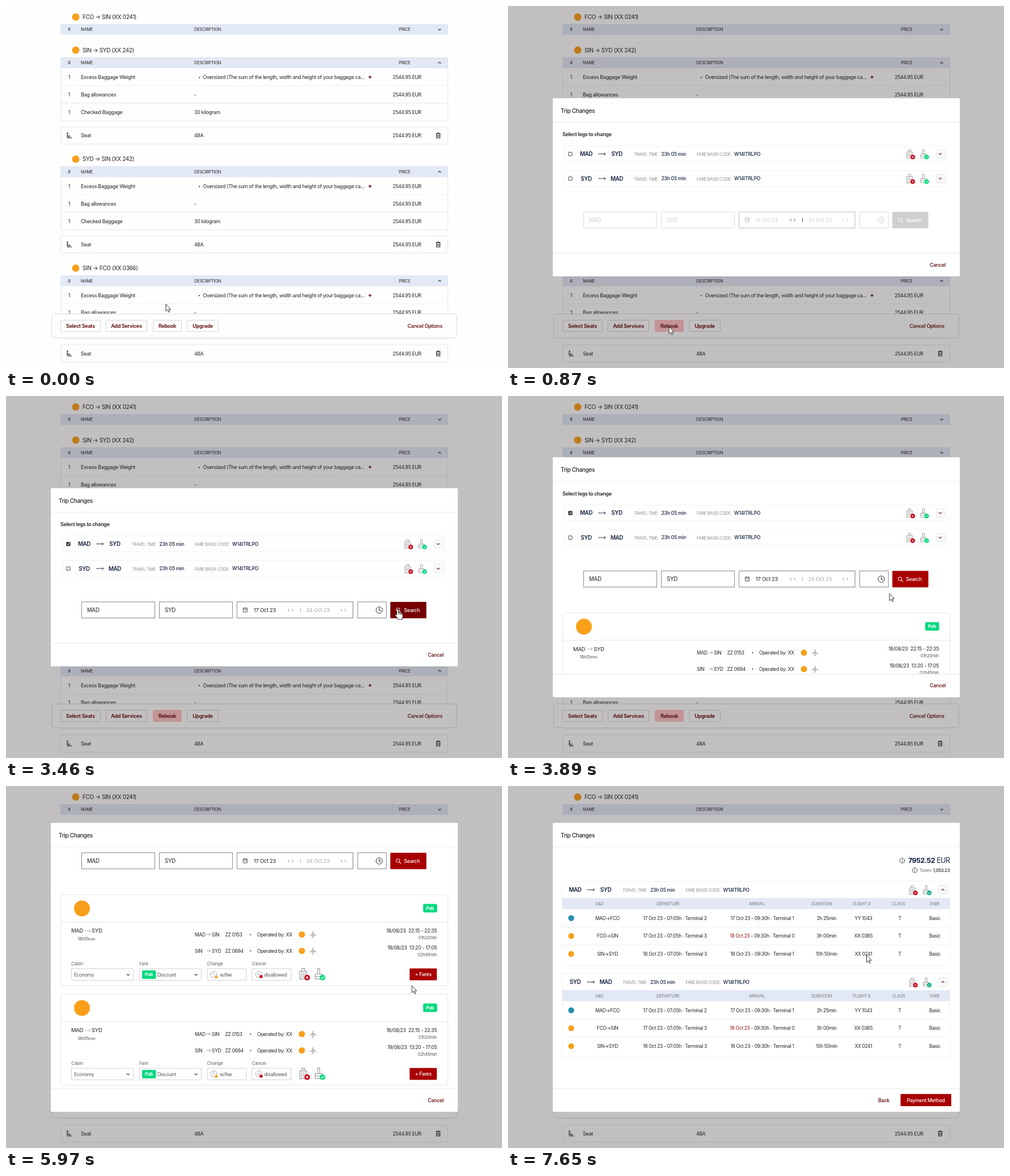
An HTML page that plays this animation: 875 by 640 pixels, repeating every 8000 ms.

```html
<!DOCTYPE html>
<html lang="en">
<head>
<meta charset="utf-8">
<title>Flight change</title>
<style>
html, body { margin: 0; width: 100%; height: 100%; overflow: hidden; background: #fefefe; }
svg { display: block; }
text { font-family: Inter, "Open Sans", sans-serif; letter-spacing: -.035em; white-space: pre; }
</style>
</head>
<body>
<svg id="stage" width="875" height="640" viewBox="0 0 875 640"></svg>
<script>
const INK = '#222', NAVY = '#14213f', WINE = '#5c0508', RED = '#a80000', DARK_RED = '#760000',
  BAND = '#e2e9f5', ORANGE = '#f9a01b', GREEN = '#00d97e', LINE = '#e4e6ea';

// Drawing helpers; text is centred vertically on y
const text = (x, y, s, size = 9, color = INK, weight = 400, anchor = 'start') =>
  `<text x="${x}" y="${y + size * .36}" font-size="${size}" fill="${color}" font-weight="${weight}" text-anchor="${anchor}">${s}</text>`;
const mid = (x, y, s, size, color, weight) => text(x, y, s, size, color, weight, 'middle');
const end = (x, y, s, size, color, weight) => text(x, y, s, size, color, weight, 'end');
const rect = (x, y, w, h, fill, stroke = 'none', r = 0, extra = '') =>
  `<rect x="${x}" y="${y}" width="${w}" height="${h}" fill="${fill}" stroke="${stroke}" rx="${r}" ${extra}/>`;
const path = (d, stroke = INK, width = 1, fill = 'none') =>
  `<path d="${d}" stroke="${stroke}" stroke-width="${width}" fill="${fill}"/>`;
const dot = (x, y, r, fill, stroke = 'none') => `<circle cx="${x}" cy="${y}" r="${r}" fill="${fill}" stroke="${stroke}"/>`;
const at = (x, y, s, scale = 1) => `<g transform="translate(${x} ${y}) scale(${scale})">${s}</g>`;
const group = (id, s) => `<g id="${id}">${s}</g>`;
const rule = (y, x1 = 96, x2 = 780, c = LINE) => path(`M${x1} ${y}H${x2}`, c);
const chevron = (x, y, up, c = INK) => path(`M${x - 2.5} ${y + (up ? 1.2 : -1.2)}l2.5 ${up ? -2.5 : 2.5} 2.5 ${up ? 2.5 : -2.5}`, c, 1.1);
const arrow = (x1, x2, y, c = NAVY) => path(`M${x1} ${y}H${x2}m-2.8 -2.4l2.8 2.4 -2.8 2.4`, c, .9);
const pub = (x, y) => rect(x, y, 24.5, 15, GREEN, 'none', 2) + mid(x + 12, y + 7.5, 'Pub', 7.8, '#fff', 700);

// Icons
const badge = (x, y, ok, color) => dot(x, y, 4, color) +
  path(ok ? `M${x - 2} ${y}l1.5 1.6 2.6 -3` : `M${x - 1.5} ${y - 1.5}l3 3m0 -3l-3 3`, '#fff', 1);
const bags = (gap, green) =>
  path('M-5 -4h10v11h-10zM-2 -4v-4h4v4M-2.5 -2v7M0 -2v7M2.5 -2v7M-3 7v1.5M3 7v1.5', '#999', .9) + badge(5.5, 5, false, '#c8001a') +
  at(gap, 0, path('M-1.5 -8h3v8h-3zM-5 0h10v7h-10zM-5 3.5h10', '#999', .9) + badge(5.5, 5, true, green));
const seat = path('M-3.5 -2.5V2.5H1.5L4 5M-2.5 0.5H1.5M-3.5 4.5H1', INK, 1.2) + dot(-3, -4, 1.2, INK);
const bin = path('M-4 -3.2h8M-1.5 -3.2v-1.3h3v1.3M-3 -3v7.3h6v-7.3M-1 -1v3.5M1 -1v3.5', INK, 1.1);
const plane = path('M0 -6q1 0 1 2v2.5l5 3v1.2l-5 -1.5v3l1.5 1.2v.9l-2.5 -.8 -2.5 .8v-.9l1.5 -1.2v-3l-5 1.5v-1.2l5 -3v-2.5q0 -2 1 -2z', 'none', 0, '#b4b4b4');
const info = (x, y) => dot(x, y, 4.3, 'none', '#444') + path(`M${x} ${y - .8}v3.2M${x} ${y - 2.6}v1`, '#444');

// Page behind the dialog
const heading = (y, route) => dot(123, y, 6.5, ORANGE) + text(135, y, route, 10);
const band = (y, up) => rect(96, y - 9.5, 684, 19, BAND) + mid(111.5, y, '#', 7.5) + text(132, y, 'NAME', 7.5) +
  text(332, y, 'DESCRIPTION', 7.5) + text(693, y, 'PRICE', 7.5) + chevron(765, y, up);
const item = (y, name, info) => mid(111.5, y, '1', 8.8) + text(132, y, name) + text(332, y, info, 8.8) + end(732.5, y, '2544.95 EUR', 8.6);
const section = (i, route) => at(0, i * 192.75,
  heading(78, route) + rect(96.5, 91, 683, 112, 'none', LINE, 2) + band(100.5, true) +
  item(126, 'Excess Baggage Weight', '') + dot(341, 126.5, 1.1, INK) +
  text(347.5, 126, 'Oversized (The sum of the length, width and height of your baggage ca...', 8.9) +
  mid(642, 125.5, '+', 10, WINE, 800) + rule(141, 96, 780, '#f0f1f3') +
  item(156.7, 'Bag allowances', '-') + rule(171.5) + item(188, 'Checked Baggage', '30 kilogram') +
  rect(96.5, 213.5, 683, 30.5, 'none', LINE, 2) + at(111.5, 229, seat) +
  text(132, 229, 'Seat') + text(332, 229, '48A', 8.8) + end(732.5, 229, '2544.95 EUR', 8.6) + at(762.5, 229, bin));
const button = (x, w, label, id = '') => rect(x + .5, 555.5, w - 1, 20, '#fff', '#d4d4d4', 1, id && `id="${id}"`) +
  mid(x + w / 2, 566, label, 9.1, WINE, 600);
const page = heading(19.5, 'FCO → SIN (XX 0241)') + band(41.5, false) +
  section(0, 'SIN → SYD (XX 242)') + section(1, 'SYD → SIN (XX 242)') + section(2, 'SIN → FCO (XX 0366)') +
  rect(80.5, 544.5, 715, 42, '#fefefe', '#dcdcdc', 4) +
  button(96, 71, 'Select Seats') + button(176, 73, 'Add Services') + button(259, 51, 'Rebook', 'rebook') +
  button(319, 56, 'Upgrade') + mid(739, 566, 'Cancel Options', 9, WINE, 500);

// One leg line: dx shifts its text, ix its icons
const leg = (y, from, to, dx, ix, up, green) =>
  mid(138 + dx, y, from, 9.8, NAVY, 600) + arrow(159 + dx, 172 + dx, y) + mid(192 + dx, y, to, 9.8, NAVY, 600) +
  text(222 + dx, y + 1, 'TRAVEL TIME:', 7, '#666', 300) + text(270.5 + dx, y, '23h 05 min', 8.7, NAVY, 500) +
  text(333 + dx, y + 1, 'FARE BASIS CODE:', 7.4, '#666', 300) + text(399 + dx, y, 'W14ITRLPO', 8.7, NAVY, 500) +
  at(708.5 + ix, y + .5, bags(24.5, green)) +
  rect(755.5 + ix, y - 7, 14, 14, '#fff', '#ddd', 1) + chevron(762.5 + ix, y, up, WINE);
const choice = (y, from, to) => rect(100.5, y - 14, 673, 28, '#fff', '#f0f2f5') +
  rect(106.8, y - 3, 6.2, 6.2, '#fff', '#444', .5) + leg(y, from, to, 0, 0, false, GREEN);

const angles = (x, c) => path(`M${x + 2.5} -2.2l-2.2 2.2 2.2 2.2M${x + 7} -2.2l2.2 2.2 -2.2 2.2`, c, .9);
const form = on => {
  const edge = on ? '#8a8a8a' : '#dcdcdc', ink = on ? INK : '#cfcfcf', pale = on ? '#aaa' : '#d4d4d4';
  return rect(133.5, -14.5, 129, 28.5, '#fff', edge) + text(143, 0, 'MAD', 9.8, ink) +
    rect(270.5, -14.5, 129, 28.5, '#fff', edge) + text(280, 0, 'SYD', 9.8, ink) +
    rect(407.5, -14.5, 204.5, 28.5, '#fff', on ? edge : '#bbb') +
    path('M418.5 -3.5h7v7h-7zM418.5 -1.5h7M420 -5v1.5M424 -5v1.5M422.5 1h1.5', on ? '#444' : '#bbb', .9) +
    text(437, 0, '17 Oct 23', 9.5, ink) + angles(497.5, on ? '#777' : '#333') + path('M519.5 -3.5v7', on ? '#aaa' : '#333', .9) +
    text(529.5, 0, '24 Oct 23', 9.5, pale) + angles(590.5, on ? '#777' : '#ccc') +
    rect(620.5, -14.5, 50.5, 28.5, '#fff', edge) + dot(658.5, 0, 5.6, 'none', ink) + path('M658.5 -3.5v3.7l2.8 1.6', ink, 1.1) +
    rect(678, -14.5, 63.5, 29, on ? RED : '#cfcfcf', 'none', 1, on ? 'id="search"' : '') +
    dot(691.5, -.5, 3.2, 'none', '#fff') + path('M693.8 1.8l3 3', '#fff', 1.1) + text(702, .3, 'Search', 8.9, '#fff', 500);
};

const hop = (y, from, to, code) => text(333, y, from, 8.5) + arrow(354, 361, y, '#999') + text(363, y, to, 8.5) +
  text(386.5, y, code, 8.5) + dot(431.5, y, 1, INK) + text(443, y, 'Operated by: XX', 8.5) + dot(522, y, 5.5, ORANGE) + at(541.5, y, plane);
const field = (x, w, label) => text(x, 122.5, label, 8.2, '#666') + rect(x + .5, 131, w, 20.5, '#fff', '#d0d0d0', 1);
const offer = (y, id) => at(0, y,
  rect(96.5, 0, 683, 161, '#fff', '#dde6ef', 3) + dot(134, 24.5, 14, ORANGE) + pub(736, 16.5) + rule(48.5, 96, 780, '#dde6ef') +
  text(115, 64, 'MAD', 9.6) + arrow(140, 149, 64, '#aaa') + text(151, 64, 'SYD', 9.6) + mid(142, 78, '18h05min', 7.3, '#555') +
  hop(70.5, 'MAD', 'SIN', 'ZZ 0153') + hop(99.5, 'SIN', 'SYD', 'ZZ 0694') +
  end(760, 64, '18/08/23\u00a0 22:15 - 22:35', 8.7) + end(760, 76.5, '01h20min', 7.5, '#555') +
  end(760, 93.5, '19/08/23\u00a0 13:20 - 17:05', 8.7) + end(760, 106, '02h45min', 7.5, '#555') +
  field(115, 109.5, 'Cabin') + text(120, 141.5, 'Economy', 8.5, '#555') + chevron(215.5, 141.5) +
  field(235, 109, 'Fare') + pub(240, 134) + text(267, 141.5, 'Discount', 8.5, '#555') + chevron(335, 141.5) +
  field(354.5, 69, 'Change') + dot(366.5, 141, 5.5, 'none', '#aaa') + path('M364 138.500l5 5m-2.500 -6v3', '#aaa', .9) +
  dot(371, 145.5, 2.6, '#f7a823') + text(377, 141.5, 'w/fee', 8.6, '#555') +
  field(433.5, 69, 'Cancel') + dot(446, 141, 5.5, 'none', '#aaa') + path('M444 139l4 4m0 -4l-4 4', '#aaa', .9) +
  dot(450, 145, 2.8, '#c8001a') + text(455.5, 141.5, 'disallowed', 8.6, '#555') +
  at(524.5, 140.5, bags(22, GREEN), 1.23) +
  rect(712, 130.5, 48, 21, RED, 'none', 1, id) + mid(736, 141, '+ Fares', 8.8, '#fff', 500));

const search = text(96, 21.5, 'Select legs to change', 9, INK, 600) +
  choice(56, 'MAD', 'SYD') + choice(99.5, 'SYD', 'MAD') +
  group('tick', rect(106.8, 53, 6.2, 6.2, '#444', '#444', .5) + path('M108 56l1.500 1.600 2.500 -3', '#fff')) +
  at(0, 173, form(false) + group('live', form(true))) +
  offer(232.5, 'id="fares"') + offer(408.5, '');

// Price summary
const flights = [
  ['#2490ac', 'MAD→FCO', '17 Oct 23', '2', '17 Oct 23', '1', '2h 25min', 'YY 1043'],
  [ORANGE, 'FCO→SIN', '17 Oct 23', '3', '<tspan fill="#8a1010">18 Oct 23</tspan>', '0', '3h 00min', 'XX 0365'],
  [ORANGE, 'SIN→SYD', '18 Oct 23', '3', '18 Oct 23', '1', '10h 50min', 'XX 0241']];
const columns = { 'O&amp;D': 161, DEPARTURE: 282.5, ARRIVAL: 439, DURATION: 553, 'FLIGHT #': 624, CLASS: 689, FARE: 753 };
const table = (dy, from, to) => at(0, dy,
  rect(95.5, 168.5, 684, 149, '#fff', '#f0f1f3') + leg(183.5, from, to, -19.5, 4.7, true, '#12b188') +
  rect(96, 198, 684, 19.5, BAND) +
  Object.entries(columns).map(([name, x]) => mid(x, 208, name, 7.4, '#777')).join('') +
  flights.map(([color, route, out, gate, back, dock, time, code], i) => {
    const y = 233.5 + i * 31.7;
    return dot(111.5, y, 5.2, color) + mid(175.5, y, route, 8.4) +
      mid(294.5, y, `${out} - 07:05h · Terminal ${gate}`, 8.4) + mid(448.5, y, `${back} - 09:30h · Terminal ${dock}`, 8.4) +
      mid(562, y, time, 8.4) + mid(627, y, code, 8.4) + mid(691, y, 'T', 8.4) + mid(753, y, 'Basic', 8.4) +
      (i < 2 ? rule(y + 15.8, 96, 780, '#eceef1') : '');
  }).join(''));
const summary = at(0, -107.5,
  text(96, 101.5, 'Pricing', 10, INK, 600) + info(695.5, 132) +
  end(779.5, 132, '<tspan font-weight="700">7952.52</tspan> EUR', 12.4, NAVY) + info(717.5, 149) +
  end(779.5, 149.5, '<tspan fill="#777" font-weight="400">Taxes: </tspan>1,053.23', 7.8, INK, 500) +
  table(0, 'MAD', 'SYD') + table(163, 'SYD', 'MAD'));

const $ = id => document.getElementById(id);
$('stage').innerHTML = rect(0, 0, 875, 640, '#fefefe') + page +
  rect(0, 0, 875, 640, '#1e1418', 'none', 0, 'id="shade"') +
  group('modal', rect(79, 0, 718, 0, '#fff', 'none', 2, 'id="panel"') +
    group('head', text(93, 22, 'Trip Changes', 10.1, INK, 500) + rule(42.5, 79, 797, '#ececec')) +
    `<svg id="view" x="0" width="875">${group('search-page', search)}${group('summary', summary)}</svg>` +
    group('foot', rule(-41, 79, 797, '#e6e6e6') + group('cancel', end(772, -20.5, 'Cancel', 9, WINE, 500)) +
      group('pay', mid(663, -20.5, 'Back', 9, WINE, 500) + rect(692.5, -31.5, 89.5, 21.5, RED, 'none', 1) +
        mid(737, -20.5, 'Payment Method', 8.8, '#fff', 500)))) +
  dot(0, 0, 0, '#888').replace('<circle', '<circle id="ring" opacity=".35"') +
  group('cursor', group('pointer', path('M0 0V12.500L2.800 9.800 4.900 14.300 6.800 13.500 4.800 9.200H8.600Z', '#222', .9, '#fff')) +
    group('hand', path('M-1.600 1.600a1.600 1.600 0 0 1 3.200 0V6.500c1 -.8 2.400 -.4 2.700 .6 1 -.6 2.200 -.1 2.500 .9 1.200 -.4 2.200 .4 2.200 1.600V13c0 1 -.6 2 -1 3v2H0v-1.600C-1.500 14.600 -2.700 12.800 -4 11c-.9 -1.200 .6 -2.600 2 -1.300l.4 .5z', '#222', .9, '#fff') +
      path('M1.600 6.500v3M4.300 7.500v2.500M6.800 8.500v2', '#222', .8)));

// Motion
const trail = [[0, 282, 527], [210, 282, 527], [430, 284, 567], [1020, 284, 567], [1760, 655, 265], [2410, 655, 265],
  [2560, 649, 300], [2840, 691, 377], [3670, 691, 377], [4110, 655, 322], [4260, 655, 322], [4320, 655, 324],
  [4960, 655, 324], [5750, 683, 391], [5830, 683, 391], [5970, 716, 353], [6130, 731, 335], [6500, 731, 335],
  [7080, 632, 307], [7160, 632, 307], [7650, 632.5, 299], [8000, 632.5, 299]];
const clicks = [[440, 150], [1840, 210], [3390, 70], [6280, 150]];
const within = (t, a, b) => t >= a && t < b;
const ramp = (t, a, b) => {
  const p = Math.min(1, Math.max(0, (t - a) / (b - a)));
  return p * p * (3 - 2 * p);
};
const set = (id, attrs) => { for (const k in attrs) $(id).setAttribute(k, attrs[k]); };
const show = (id, on) => set(id, { visibility: on ? 'visible' : 'hidden' });
const move = (id, x, y) => set(id, { transform: `translate(${x} ${y})` });

function draw(t) {
  const open = ramp(t, 520, 820), grow = ramp(t, 3670, 4080);
  const top = 163 - 98 * grow, bottom = 478 + 98 * grow, paid = t >= 6500;
  set('shade', { opacity: .27 * open });
  set('modal', { opacity: open });
  move('modal', 0, -30 * (1 - open));
  set('panel', { y: top, height: bottom - top });
  move('head', 0, top);
  move('foot', 0, bottom);
  set('view', { y: top + 42.5, height: bottom - top - 83.5 });
  move('search-page', 0, t < 4960 ? 0 : t < 5030 ? -74 : -148);
  move('summary', 0, t < 6800 ? 27 : 0);
  show('search-page', !paid);
  show('summary', paid);
  show('cancel', !paid);
  show('pay', paid);
  set('tick', { opacity: +(t >= 2200) });
  set('live', { opacity: ramp(t, 2130, 2270) });
  set('rebook', { fill: t < 360 ? '#fff' : '#ffc4c4', stroke: t < 360 ? '#d4d4d4' : '#ffc4c4' });
  set('search', { fill: within(t, 2740, 3820) ? DARK_RED : RED });
  set('fares', { fill: within(t, 6040, 6500) ? DARK_RED : RED });

  const i = Math.max(1, trail.findIndex(k => k[0] > t)), [a, x0, y0] = trail[i - 1], [b, x1, y1] = trail[i];
  const p = ramp(t, a, b), x = x0 + (x1 - x0) * p, y = y0 + (y1 - y0) * p;
  const hand = within(t, 360, 600) || within(t, 1760, 2480) || within(t, 2740, 3750) || within(t, 6040, 6500);
  move('cursor', x, y);
  show('hand', hand);
  show('pointer', !hand);
  const click = clicks.find(([start, span]) => within(t, start, start + span));
  set('ring', { cx: x, cy: y, r: click ? 5 + 4 * (t - click[0]) / click[1] : 0 });
}
function tick() {
  draw(performance.now() % 8000);
  requestAnimationFrame(tick);
}
tick();
</script>
</body>
</html>
```
